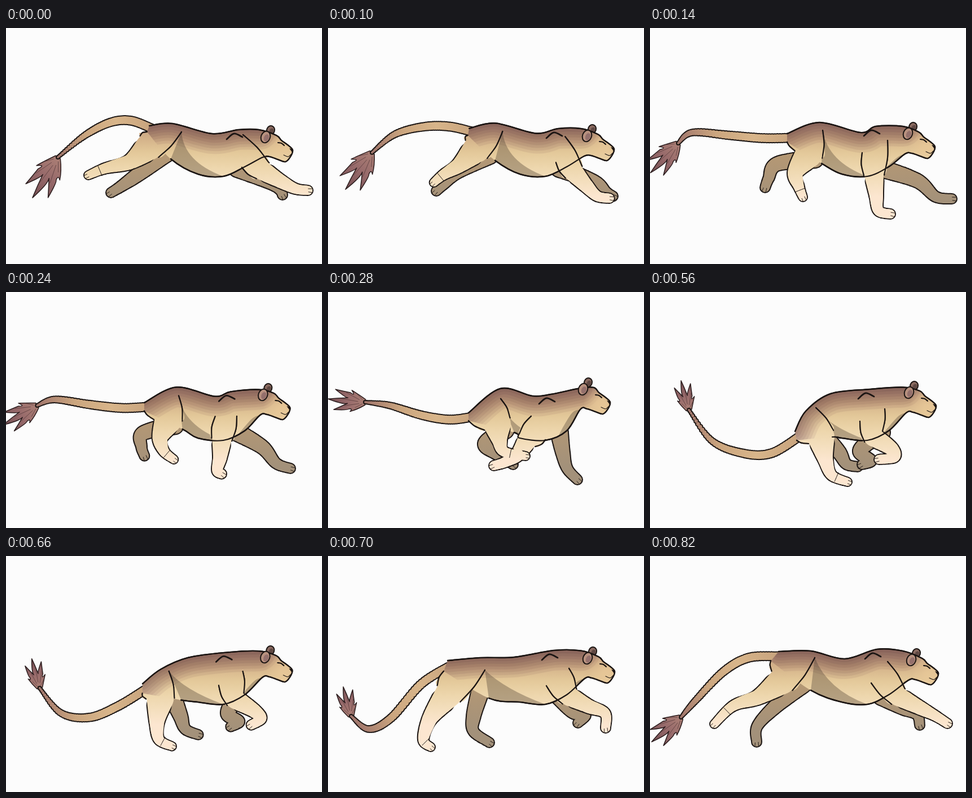
An HTML page with a canvas for the animation above (840 ms loop, 560 by 420 pixels).

```html
<!DOCTYPE html>
<html lang="en">
<head>
<meta charset="utf-8">
<title>Running lioness</title>
<style>
html, body { margin: 0; width: 100%; height: 100%; overflow: hidden; background: #fcfcfc; }
canvas { display: block; width: 560px; height: 420px; }
</style>
</head>
<body>
<canvas id="stage" width="560" height="420"></canvas>
<script>
const ctx = document.getElementById('stage').getContext('2d');
const INK = '#1b1513';
const TAU = Math.PI * 2;

// A pose holds only joints; all outlines are built from them.
// hair = direction in degrees and length of the tail tuft.
const poses = [
  {
    back: '254,174 295,170 365,188 412,181', root: '250,185', groin: '292,233', nose: '508,217',
    thigh: '311,185', hind: '254,211 218,239 175,250 146,262',
    shoulder: '420,190 418,248', fore: '455,254 487,273 513,286 535,289',
    farHind: '232,262 202,283 186,293', farFore: '470,275 486,288 490,297',
    tail: '222,165 185,168 140,191 92,230', hair: '122,85'
  }, {
    back: '243,188 300,168 373,186 400,175', root: '243,203', groin: '304,241', nose: '505,211',
    thigh: '306,182', hind: '281,225 257,258 264,283 271,301',
    shoulder: '421,200 376,222', fore: '397,262 401,298 405,325 426,331',
    farHind: '225,242 210,268 204,284', farFore: '474,272 506,300 535,304',
    tail: '200,196 140,191 75,186 50,205', hair: '133,72'
  }, {
    back: '249,215 305,172 362,185 395,182', root: '249,229', groin: '330,250', nose: '500,196',
    thigh: '306,190', hind: '300,235 304,264 312,284 350,292',
    shoulder: '385,263 360,221', fore: '353,264 335,290 313,303 294,309',
    farHind: '278,270 300,290 328,307', farFore: '416,285 424,314 442,334',
    tail: '215,227 165,219 110,202 66,196', hair: '185,66'
  }, {
    back: '250,245 277,198 320,180 392,185', root: '255,264', groin: '328,262', nose: '498,196',
    thigh: '299,205', hind: '303,250 322,284 338,309 370,325',
    shoulder: '384,275 363,240', fore: '363,274 372,293 380,309 381,322',
    farHind: '304,292 314,306 332,316', farFore: '352,305 328,330 332,346',
    tail: '215,264 165,260 105,234 54,202', hair: '240,60'
  }, {
    back: '257,248 276,212 320,181 390,173', root: '260,264', groin: '323,258', nose: '507,202',
    thigh: '294,206', hind: '303,258 311,298 322,326 350,338',
    shoulder: '416,208 372,230', fore: '396,258 428,279 433,294 406,298',
    farHind: '335,285 348,306 368,311', farFore: '372,282 392,300 376,307',
    tail: '215,287 165,287 110,265 69,210', hair: '255,54'
  }, {
    back: '212,186 270,181 330,180 400,168', root: '205,205', groin: '285,253', nose: '508,205',
    thigh: '278,203', hind: '214,245 180,290 169,327 182,340',
    shoulder: '427,200 387,231', fore: '428,250 463,268 491,280 492,306',
    farHind: '258,285 258,312 286,332', farFore: '435,277 456,283 443,297',
    tail: '165,228 112,288 72,308 41,285', hair: '255,54'
  }, {
    back: '228,170 285,169 345,183 402,166', root: '214,187', groin: '285,239', nose: '511,208',
    thigh: '292,181', hind: '234,222 190,252 147,267 114,299',
    shoulder: '421,188 392,226', fore: '440,250 480,271 505,284 527,298',
    farHind: '222,268 190,303 189,331', farFore: '448,270 473,282 478,301',
    tail: '175,181 130,206 80,258 55,287', hair: '140,68'
  }
].map(pose => Object.fromEntries(Object.entries(pose).map(
  ([part, text]) => [part, text.split(' ').map(p => p.split(',').map(Number))])));

// Fixed shapes: the head hangs on the nose, the belly barely moves.
const HEAD = [[-29, -26], [-20, -17], [-9, -9], [0, 0], [-4, 12], [-13, 21], [-26, 17], [-41, 12]];
const CHEST = [423, 247], BELLY = [[385, 264], [340, 260]];
const NEAR_HIND = [25, 14, 10, 8], NEAR_FORE = [18, 13, 10, 9];
const FAR_LEG = [16, 13, 10, 9], TAIL = [8, 8, 7.5, 6, 3];

const mix = (p, q, s) => p.map((v, i) => v + (q[i] - v) * s);
const add = (p, dx, dy) => [p[0] + dx, p[1] + dy];
const polar = (p, angle, r) => add(p, Math.cos(angle) * r, Math.sin(angle) * r);
const dist = (p, q) => Math.hypot(p[0] - q[0], p[1] - q[1]);

// Each pose holds for 100 ms, then moves on in 20 ms steps.
function poseAt(ms) {
  const k = Math.floor(ms / 140), d = ms % 140;
  const step = d < 100 ? 0 : d < 120 ? 1 : 2;
  if (!step) return poses[k];
  const a = poses[k], b = poses[k + 1], s = step / (k === 5 ? 2 : 3);
  return Object.fromEntries(Object.keys(a).map(
    part => [part, a[part].map((p, i) => mix(p, b[part][i], s))]));
}

function curve(pts, last = pts.length - 1) {
  const path = new Path2D();
  path.moveTo(...pts[0]);
  for (let i = 0; i < last; i++) {
    const a = pts[i - 1] || pts[i], b = pts[i], c = pts[i + 1], d = pts[i + 2] || c;
    path.bezierCurveTo(
      b[0] + (c[0] - a[0]) / 6, b[1] + (c[1] - a[1]) / 6,
      c[0] - (d[0] - b[0]) / 6, c[1] - (d[1] - b[1]) / 6, c[0], c[1]);
  }
  return path;
}

function spline(pts, u) {
  const x = Math.min(u, 0.9999) * (pts.length - 1), i = Math.floor(x), t = x - i;
  const b = pts[i], c = pts[i + 1], a = pts[i - 1] || b, d = pts[i + 2] || c;
  return b.map((v, n) => v + 0.5 * t * (c[n] - a[n]
    + t * (2 * a[n] - 5 * v + 4 * c[n] - d[n] + t * (3 * (v - c[n]) + d[n] - a[n]))));
}

function paint(path, fill) {
  ctx.fillStyle = fill;
  ctx.fill(path);
}

function ink(path, width = 2, color = INK) {
  ctx.lineWidth = width;
  ctx.strokeStyle = color;
  ctx.stroke(path);
}

function line(p, q, width = 1) {
  ink(curve([p, q]), width);
}

function fade(g, ...colors) {
  colors.forEach((color, i) => g.addColorStop(i / (colors.length - 1), color));
  return g;
}

// Union of discs whose centre and radius follow the joints.
function tube(joints, grow, from = 0) {
  const path = new Path2D(), n = 50;
  for (let i = Math.ceil(from * n); i <= n; i++) {
    const [x, y, r] = spline(joints, i / n);
    path.moveTo(x + r + grow, y);
    path.arc(x, y, r + grow, 0, TAU);
  }
  return path;
}

const sized = (pts, radii) => pts.map((p, i) => [...p, radii[i]]);

function drawTube(joints, fill) {
  paint(tube(joints, 1), INK);
  paint(tube(joints, -1), fill);
}

function toes(joints) {
  const [wrist, toe] = joints.slice(-2);
  const angle = Math.atan2(toe[1] - wrist[1], toe[0] - wrist[0]);
  for (const side of [-0.5, 0.35]) {
    line(polar(toe, angle + side, toe[2] - 1), polar(toe, angle + side * 3, 3));
  }
}

// A near leg: a wide upper part open towards the body, then a tube down to the paw.
function drawLeg(front, rear, joints, fill) {
  const [j, next] = joints, top = mix(front, rear, 0.5);
  const angle = Math.atan2(next[1] - top[1], next[0] - top[0]) + Math.PI / 2;
  const edge = side => polar(j, angle, side * j[2]);
  const flip = dist(front, edge(1)) + dist(rear, edge(-1))
    > dist(front, edge(-1)) + dist(rear, edge(1)) ? -1 : 1;
  const bulge = side => polar(mix(side === flip ? front : rear, edge(side), 0.5), angle, side * 3);
  const frontLine = [front, bulge(flip), edge(flip)];
  const rearLine = [edge(-flip), bulge(-flip), rear];

  ink(curve(frontLine), 2.2);
  ink(curve(rearLine), 2.2);
  paint(tube(joints, 1, 0.12), INK);
  paint(curve([...frontLine, ...rearLine]), fill);
  ink(curve(frontLine), 2.2);
  ink(curve(rearLine), 2.2);
  paint(tube(joints, -1), fill);
  toes(joints);
}

function ankle(joints) {
  const [wrist, toe] = joints.slice(-2), p = mix(wrist, toe, 0.3);
  const angle = Math.atan2(toe[1] - wrist[1], toe[0] - wrist[0]) + Math.PI / 2;
  line(polar(p, angle, p[2] - 1), polar(p, angle, 1 - p[2]));
}

function drawTail(p) {
  const base = add(mix(p.back[0], p.root[0], 0.5), 8, 0);
  const joints = sized([base, ...p.tail], TAIL);
  const end = p.tail[3], [degrees, length] = p.hair[0], dir = degrees * TAU / 360;

  // Five locks in a fan, longest in the middle.
  const tuft = new Path2D(), strands = new Path2D();
  tuft.moveTo(...polar(end, dir - 1.6, 5));
  for (let i = -2; i <= 2; i++) {
    const a = dir + i * 0.32, r = length * (1 - 0.13 * i * i);
    tuft.quadraticCurveTo(...polar(end, a - 0.2, r * 0.6), ...polar(end, a, r));
    tuft.quadraticCurveTo(...polar(end, a + 0.06, r * 0.75),
      ...(i < 2 ? polar(end, a + 0.16, length * 0.48) : polar(end, dir + 1.6, 5)));
    strands.moveTo(...polar(end, a, r * 0.2));
    strands.lineTo(...polar(end, a + 0.06, r * 0.65));
  }
  tuft.closePath();
  const tip = polar(end, dir, length);
  paint(tuft, fade(ctx.createLinearGradient(...end, ...tip), '#ab7f75', '#96696a', '#744e52'));
  ink(tuft, 1.5, '#2a1c1d');
  ink(strands, 0.8, '#5a3d3e');
  drawTube(joints, fade(ctx.createLinearGradient(...base, ...end),
    '#c8a47e', '#d8b58a', '#cba67f', '#a1766c'));
}

function drawEar([x, y], rx, ry, fill, inner) {
  const ear = new Path2D(), hollow = new Path2D();
  ear.ellipse(x, y, rx, ry, 0.35, 0, TAU);
  hollow.ellipse(x + 1.5, y + 1.5, rx * 0.55, ry * 0.62, 0.35, 0, TAU);
  paint(ear, fill);
  ink(ear, 2);
  paint(hollow, inner);
}

function drawFace(nose) {
  const at = (dx, dy) => add(nose, dx, dy);
  paint(curve([at(-6, -3), at(0, -1), at(-1, 4)]), INK);
  ink(curve([at(-3, 8), at(-8, 12), at(-16, 9)]), 1.2);
  ink(curve([at(-26, -13), at(-20, -12), at(-15, -8)]), 2.2);
}

function draw(p) {
  const [root] = p.root, [groin] = p.groin, [nose] = p.nose, [thigh] = p.thigh;
  const wither = p.back[3];
  const nape = [448, (wither[1] + nose[1] - 36) / 2];
  const throat = add(nose, -53, 13);
  const spine = [...p.back, nape];
  const outline = [...spine, ...HEAD.map(h => add(nose, ...h)), throat, CHEST, ...BELLY, groin, root];
  const body = curve(outline);
  const coat = fade(ctx.createLinearGradient(0, 168, 0, 300),
    '#c29e83', '#d2b088', '#e3c899', '#edd6ac', '#f4dfbe', '#fce6d0');
  const farCoat = fade(ctx.createLinearGradient(0, 225, 0, 310), '#b59874', '#a3917a');
  const shadow = 'rgba(122, 104, 82, .5)';

  ctx.fillStyle = '#fcfcfc';
  ctx.fillRect(0, 0, 560, 420);
  ctx.lineJoin = ctx.lineCap = 'round';

  drawTail(p);
  for (const [start, leg] of [[mix(root, groin, 0.8), p.farHind], [[410, 250], p.farFore]]) {
    const joints = sized([start, ...leg], FAR_LEG);
    drawTube(joints, farCoat);
    toes(joints);
  }
  drawEar(add(nose, -39, -35), 7, 8, '#8a6a60', '#5f4843');

  paint(body, coat);
  ctx.save();
  ctx.clip(body);
  const under = new Path2D();
  under.moveTo(...thigh);
  under.quadraticCurveTo(...add(BELLY[1], -25, -22), ...BELLY[0]);
  under.lineTo(...add(BELLY[1], 0, 8));
  under.lineTo(...groin);
  paint(under, shadow);
  paint(curve([throat, add(throat, -16, 8), add(CHEST, -16, 14), add(CHEST, 4, 4)]), shadow);
  ctx.restore();
  ink(curve(outline, outline.length - 2), 2.4);

  const fore = sized(p.fore, NEAR_FORE), hind = sized(p.hind, NEAR_HIND);
  drawLeg(...p.shoulder, fore, coat);
  drawLeg(thigh, root, hind, coat);
  ankle(hind);

  // Mauve along the back, pale around the muzzle.
  ctx.save();
  ctx.clip(body);
  ctx.globalCompositeOperation = 'multiply';
  for (let w = 12; w <= 72; w += 10) ink(curve(spine), w, 'rgba(150, 108, 136, .11)');
  const muzzle = add(nose, -14, 5);
  ctx.globalCompositeOperation = 'lighten';
  ctx.fillStyle = fade(ctx.createRadialGradient(...muzzle, 8, ...muzzle, 34),
    'rgba(232, 200, 152, .8)', 'rgba(232, 200, 152, 0)');
  ctx.fillRect(muzzle[0] - 34, muzzle[1] - 34, 68, 68);
  ctx.restore();
  ink(curve(outline, outline.length - 2), 2.2);
  drawLegsOver(p, fore, hind, coat);

  ink(curve([[-21, 17], [-8, 7], [7, 13]].map(d => add(wither, ...d))), 2.8);
  drawEar(add(nose, -48, -23), 8, 10.5, '#b8917f', '#94706c');
  drawFace(nose);
}

// Paws and shins stay in front of the body outline.
function drawLegsOver(p, fore, hind, coat) {
  for (const joints of [fore, hind]) {
    const low = joints.slice(1);
    paint(tube(low, -1), coat);
    toes(joints);
  }
  ankle(hind);
}

const start = performance.now();
function tick() {
  draw(poseAt((performance.now() - start) % 840));
  requestAnimationFrame(tick);
}
tick();
</script>
</body>
</html>
```
